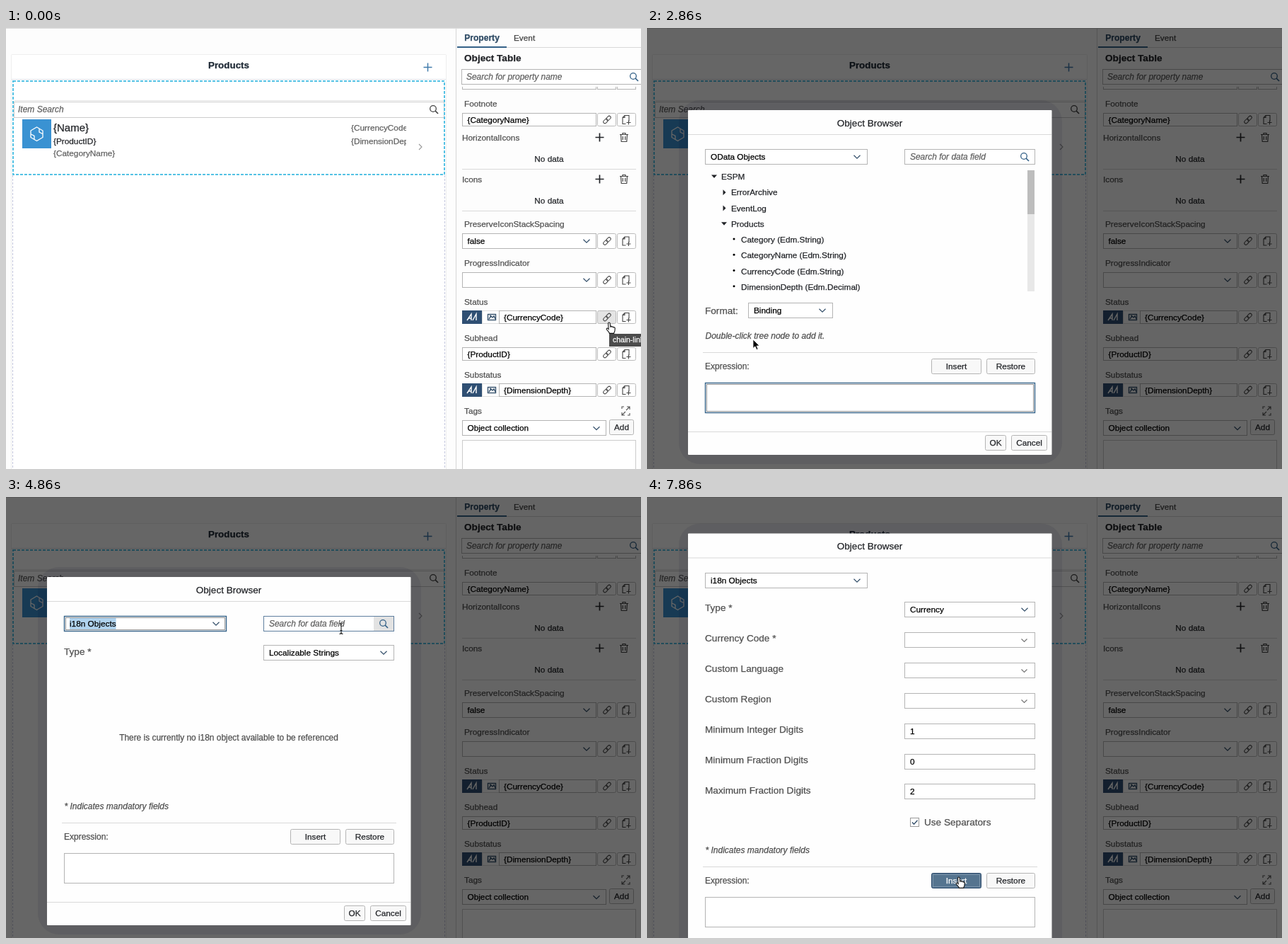
These frames come from a looping animation (898 px wide and 623 px high, 8 s). An HTML page:

```html
<!DOCTYPE html>
<html lang="en">
<head>
<meta charset="utf-8">
<title>Object Browser</title>
<style>
html, body { margin: 0; width: 100%; height: 100%; overflow: hidden; background: #fdfdfd; }
svg { display: block; width: 898px; height: 623px; font: 11.8px 'Liberation Sans', Arial, sans-serif; }
text { white-space: pre; stroke-width: .25px; }
</style>
</head>
<body>
<svg id="stage" viewBox="0 0 898 623" xmlns="http://www.w3.org/2000/svg">
  <clipPath id="cell"><rect x="480" y="130" width="86" height="45"/></clipPath>
  <clipPath id="below"><rect x="640" y="83" width="258" height="10"/></clipPath>
  <g id="page"></g>
  <rect id="dim" width="898" height="623" opacity="0"/>
  <g id="dialog"></g>
  <g id="pointer"></g>
</svg>
<script>
const LOOP = 8000, INK = '#222428', GREY = '#606060', LABEL = '#505050', LINE = '#b4b4b4', BLUE = '#346187';
const $ = id => document.getElementById(id);
const ruler = document.createElement('canvas').getContext('2d');
ruler.font = "11.8px 'Liberation Sans', Arial, sans-serif";
const widthOf = s => ruler.measureText(s).width;

// Basic shapes; text is placed by its vertical middle.
const text = (x, mid, s, { z = 11.8, f = INK, a = 'start', i, b, more = '' } = {}) =>
  `<text x="${x}" y="${mid + z * .345}" font-size="${z}" fill="${f}" stroke="${f}" text-anchor="${a}"` +
  `${i ? ' font-style="italic"' : ''}${b ? ' font-weight="bold"' : ''} ${more}>${s}</text>`;
const value = (x, mid, s) => text(x, mid, s, { f: '#000' });
const fill = (x, y, w, h, c, more = '') =>
  `<rect x="${x}" y="${y}" width="${w}" height="${h}" fill="${c}" ${more}/>`;
const box = (x, y, w, h, c = LINE, bg = '#fff', more = '') =>
  `<rect x="${x + .5}" y="${y + .5}" width="${w - 1}" height="${h - 1}" fill="${bg}" stroke="${c}" ${more}/>`;
const path = (d, c = INK, w = 1, more = '') =>
  `<path d="${d}" fill="none" stroke="${c}" stroke-width="${w}" ${more}/>`;
const hline = (x1, x2, y, c = '#d9d9d9') => fill(x1, y, x2 - x1, 1, c);

// Icons, centred on x, y.
const chevron = (x, y, r = 4.5, c = '#35506b') => path(`M${x - r} ${y - r / 2}l${r} ${r} ${r} ${-r}`, c, 1.2);
const lens = (x, y, c = BLUE) =>
  `<circle cx="${x - 1}" cy="${y - 1}" r="4.3" fill="none" stroke="${c}" stroke-width="1.3"/>` +
  path(`M${x + 2} ${y + 2}l4 4`, c, 1.7);
const plus = (x, y, r, c, w) => path(`M${x - r} ${y}h${2 * r}M${x} ${y - r}v${2 * r}`, c, w);
const chain = (x, y) => `<g transform="translate(${x} ${y}) rotate(-45)">` +
  box(-7, -2.7, 8.2, 5.4, '#444', 'none', 'rx="2.2"') + box(-1.2, -2.7, 8.2, 5.4, '#444', 'none', 'rx="2.2"') + '</g>';
const sheet = (x, y) =>
  path(`M${x - 1} ${y + 6}h-4.5v-9l3-3h6v8M${x - 2.5} ${y - 6}v3h-3`, '#444', 1.1) + plus(x + 3, y + 4, 3, '#444', 1.1);
const bin = (x, y) =>
  path(`M${x - 6} ${y - 4}h12M${x - 2} ${y - 4}v-2h4v2M${x - 4.5} ${y - 4}l.7 10h7.6l.7-10M${x - 1.7} ${y - 1.5}v5M${x + 1.7} ${y - 1.5}v5`, '#444', 1.2);

const button = (x, y, w, h, s, c = LINE, bg = '#f8f8f8', f = INK) =>
  box(x, y, w, h, c, bg, 'rx="2"') + text(x + w / 2, y + h / 2, s, { a: 'middle', f });
const ring = (x, y, w, h) =>
  box(x, y, w, h, BLUE, '#fff', 'stroke-width="1.4"') + box(x + 2, y + 2, w - 4, h - 4, '#333', 'none', 'stroke-dasharray="1 1"');
const marked = (x, mid, s, from = x) =>
  fill(from, mid - 8, x + widthOf(s) - from, 16, '#b0d3ee') + value(x, mid, s);
const select = (x, y, w, s, focused) =>
  (focused ? ring : box)(x, y, w, 22) + (focused ? marked : value)(x + 8, y + 11, s) + chevron(x + w - 15, y + 11);

function tools(y, h, hot) {
  return box(836, y, 27, h, '#bbb', hot ? '#e4e4e4' : '#fff', 'rx="2"') + chain(850, y + h / 2) +
    box(864, y, 27, h, '#bbb', '#fff', 'rx="2"') + sheet(877.5, y + h / 2);
}
const field = (y, h, s) => box(645, y, 190, h) + value(652.5, y + h / 2, s) + tools(y, h);
const combo = (y, s) => field(y, 22, s) + chevron(821, y + 11);
const toggled = (y, s, hot) =>
  fill(645, y, 28, 19, '#2f4f73') +
  path(`M652 ${y + 14}l6-9v9m-4-3h4M660 ${y + 14}l5-9v9`, '#fff', 1.4) +
  box(673, y, 25, 19, '#ddd') + box(681, y + 5, 12, 9, '#35506b', '#fff', 'stroke-width="1.4"') +
  path(`M683 ${y + 12}l3-4 2 2 2-2 2 4M684 ${y + 7.5}h2`, '#35506b', 1.4) +
  box(697, y, 138, 19) + value(704, y + 9.5, s) + tools(y, 19, hot);

function canvasPane() {
  const label = (y, s) => text(488, y, s, { f: GREY, more: 'clip-path="url(#cell)"' });
  return fill(0, 0, 898, 623, '#fdfdfd') + hline(0, 898, 0, '#dcdcdc') +
    fill(7, 37, 616, 600, '#eee', 'rx="2"') + fill(8, 38, 614, 590, '#fff') +
    hline(8, 622, 72, '#dde3ea') +
    text(315, 52, 'Products', { z: 13.4, b: 1, a: 'middle', f: '#1f2a36' }) +
    plus(596.5, 55.5, 6, '#427cac', 1.5) +
    path('M9.5 208V623M620.5 208V623', '#c3c6dd', 1, 'stroke-dasharray="3 2"') +
    hline(12, 619, 102, '#e2e2e2') + box(11, 104, 609, 23, '#ccc') +
    text(17, 115, 'Item Search', { z: 12, i: 1, f: GREY }) + lens(605, 115, '#444') +
    fill(23, 129, 41, 41, '#3a92d2') +
    path('M43.5 140l8.5 5v9.5l-8.5 5-8.5-5v-9.5zM47 142.5v4.5l4.500 2.500M40 157v-4.500l-4.500-2.500', '#fff', 1.3) +
    text(67, 141, '{Name}', { z: 15 }) + text(67, 160, '{ProductID}') +
    text(67, 177, '{CategoryName}', { f: GREY }) +
    label(141, '{CurrencyCode}') + label(160, '{DimensionDepth}') +
    path('M584 164l4 4-4 4', '#999', 1.1) +
    path('M10 75H620V207H10z', '#55c2e4', 2, 'stroke-dasharray="4 2"');
}

function propertyPane() {
  const label = (y, s, x = 648) => text(x, y, s, { f: LABEL });
  const list = (y, s) => label(y, s, 645) + plus(839.5, y, 6, INK, 1.7) + bin(874, y) +
    text(768, y + 30.5, 'No data', { a: 'middle' }) + hline(645, 891, Math.round(y + 44));
  return fill(637, 1, 261, 622, '#fdfdfd') + fill(636, 1, 1, 622, '#d6d6d6') +
    text(673, 14, 'Property', { z: 12.1, b: 1, a: 'middle', f: '#2d4a64' }) + text(718, 14, 'Event', { f: '#444' }) +
    hline(638, 898, 27) + fill(638, 26, 70, 2, BLUE) +
    text(648, 42, 'Object Table', { z: 13.6, b: 1 }) +
    box(644, 58, 260, 22) + text(651, 69, 'Search for property name', { z: 11.95, i: 1, f: GREY }) + lens(888, 69) +
    `<g clip-path="url(#below)">${box(645, 66, 190, 21) + box(836, 66, 27, 21) + box(864, 66, 27, 21)}</g>` +
    label(107, 'Footnote') + field(120, 19, '{CategoryName}') +
    list(154.5, 'HorizontalIcons') + list(213.5, 'Icons') +
    label(277, 'PreserveIconStackSpacing') + combo(290, 'false') +
    label(331.5, 'ProgressIndicator') + combo(345, '') +
    label(386.5, 'Status') + `<g id="status"></g>` +
    label(438, 'Subhead') + field(451, 19, '{ProductID}') +
    label(489.5, 'Substatus') + toggled(502, '{DimensionDepth}') +
    label(541, 'Tags') +
    path('M877 540l5-5m-4 0h4v4M876 542l-5 5m4 0h-4v-4M871 538v-3h3M882 544v3h-3', '#555', 1.1) +
    box(645, 554, 204, 22) + value(652.5, 565, 'Object collection') + chevron(835, 565.5) +
    button(853, 553, 35, 22, 'Add') + box(645, 582, 246, 60, '#ccc');
}

// Pointer stops: time, x, y, shape; straight moves between them, redrawn every 200 ms.
const stops = [
  [0, 853, 416, 'hand'], [60, 852, 416, 'hand'], [260, 800, 414, 'arrow'], [460, 712, 411, 'arrow'],
  [1060, 200, 514, 'beam'], [1260, 176, 514, 'beam'], [1460, 174, 514, 'beam'], [1860, 90, 514, 'beam'],
  [2660, 90, 514, 'beam'], [2860, 150, 440, 'arrow'], [3260, 297, 182, 'arrow'], [3660, 224, 316, 'arrow'],
  [4060, 150, 364, 'arrow'], [4260, 148, 365, 'arrow'], [4860, 474, 186, 'beam'], [5060, 515, 206, 'arrow'],
  [5260, 534, 220, 'arrow'], [5460, 534, 221, 'arrow'], [5860, 450, 278, 'arrow'], [6260, 448, 280, 'arrow'],
  [6660, 477, 306, 'arrow'], [7260, 446, 520, 'arrow'], [7460, 441, 537, 'hand'], [8000, 441, 537, 'hand']
];
const shapes = {
  arrow: '<path d="M0 0v12.5l2.900-2.700 2.100 4.700 2-.9-2-4.600h4z" fill="#000" stroke="#fff" stroke-width=".8"/>',
  beam: path('M-2.5-7.5q2.500 0 2.500 2v11q0 2-2.500 2M2.500-7.500q-2.500 0-2.500 2v11q0 2 2.500 2M-1.500 2.500h3', '#222', 1.1),
  hand: '<path transform="scale(1.1)" d="M-1.3 1.200c0-1.600 2.200-1.600 2.400 0l.5 4.200c.4-.8 2-.6 2.100.4.600-.6 1.900-.3 2 .6.800-.4 1.800.1 1.800 1.200l-.3 3.200c-.2 1.200-1 1.800-1.100 3.200h-5.800c-.4-2-2.600-3.400-3.600-5.200-.6-1.200.8-2 1.800-1l.7.8z" fill="#fff" stroke="#111"/>'
};
function pointerAt(t) {
  const q = t < 60 ? 0 : 60 + Math.floor((t - 60) / 200) * 200;
  const n = stops.findLastIndex(s => s[0] <= q);
  const a = stops[n], b = stops[n + 1] || a;
  const k = b === a ? 0 : (q - a[0]) / (b[0] - a[0]);
  return { x: a[1] + (b[1] - a[1]) * k, y: a[2] + (b[2] - a[2]) * k, shape: a[3] };
}

const sources = ['OData Functions Result', 'OData Objects', 'Global Data', 'Rules', 'Image Reference', 'i18n Objects', 'Expressions'];
function menu(x, y, w, items, chosen, p) {
  const step = 30.85, h = items.length * step;
  const hot = p.x > x && p.x < x + w ? Math.floor((p.y - y) / step) : -1;
  return box(x, y, w, h + 1, '#ccc') + items.map((s, i) => {
    const bg = i === chosen ? '#17528a' : i === hot ? '#efefef' : '#fff';
    return fill(x + 1, y + i * step + .5, w - 2, step, bg) +
      text(x + 6, y + (i + .5) * step, s, { f: i === chosen ? '#fff' : INK });
  }).join('');
}

function frame(top, rule) {
  const h = rule + 145 - top;
  return fill(45, top - 14, 542, h + 27, '#0c0c28', 'rx="30" opacity=".08"') +
    fill(58, top, 514.5, h, '#fefefe', 'rx="1"') +
    text(315, top + 18, 'Object Browser', { z: 13.5, a: 'middle' }) + hline(58, 572, top + 34) +
    hline(79, 552, rule) + text(82, rule + 20, 'Expression:', { z: 12, f: LABEL }) +
    button(480, rule + 9, 69, 22, 'Restore') + hline(58, 572, rule + 112) +
    button(478, rule + 117, 30, 22, 'OK') + button(515, rule + 117, 51, 22, 'Cancel');
}
const search = (y, hot) =>
  box(364, y, 185, 22, hot ? '#5f7f9f' : LINE) + (hot ? fill(520, y + 1, 28, 20, '#e2e2e2') : '') +
  text(372, y + 10.5, 'Search for data field', { z: 11.95, i: 1, f: GREY }) + lens(534, y + 11);
const insert = (rule, down) => down
  ? button(402, rule + 9, 71, 22, 'Insert', '#2c4a6b', '#55748f', '#fff') +
    box(404, rule + 11, 67, 18, '#9db0c2', 'none', 'stroke-dasharray="1 1"')
  : button(402, rule + 9, 71, 22, 'Insert');
const note = (rule, s) => text(82.5, rule - 23.5, s, { z: 12, i: 1, f: LABEL });
const label = (y, s) => text(82, y, s, { z: 13.6, f: LABEL });
const output = (rule, focused) => (focused ? ring : box)(82, rule + 43, 467, 43);

function tree() {
  const names = ['ESPM', 'ErrorArchive', 'EventLog', 'Products', 'Category (Edm.String)',
    'CategoryName (Edm.String)', 'CurrencyCode (Edm.String)', 'DimensionDepth (Edm.Decimal)'];
  return names.map((s, i) => {
    const y = 210 + i * 22.25, level = i === 0 ? 0 : i < 4 ? 1 : 2, x = 95 + level * 14;
    const mark = level === 2 ? `<circle cx="${x}" cy="${y - 1}" r="1.5"/>`
      : i % 3 === 0 ? `<path d="M${x - 4} ${y - 2.5}h8l-4 4.5z" fill="${INK}"/>`
      : `<path d="M${x - 1.5} ${y - 4}v8l4-4z" fill="${INK}"/>`;
    return mark + text(x + 10, y, s);
  }).join('') + fill(538, 201, 10, 171, '#e8e8e8') + fill(538, 201, 10, 62, '#bdbdbd');
}

function odataView(t, p) {
  const rule = 458, open = t >= 3260, expr = '{CurrencyCode}';
  let s = frame(116, rule) + insert(rule) + search(171) + tree() +
    label(399, 'Format:') + select(143, 388, 120, 'Binding') +
    note(rule, 'Double-click tree node to add it.') + output(rule, t >= 1260 && !open) +
    select(82, 171, 230, 'OData Objects', open || t >= 500 && t < 1260);
  if (t < 2460) s += t >= 1460 ? marked(90, rule + 55, expr, p.x) : value(90, rule + 55, expr);
  return open ? s + menu(82, 195, 230, sources, 1, p) : s;
}

function stringsView(t, p) {
  const top = 113, rule = 460, picked = t >= 6260;
  const s = frame(top, rule) + insert(rule) + search(top + 55, t >= 4860 && t < 5060) +
    select(82, top + 55, 230, 'i18n Objects', t < 5260) + label(top + 105, 'Type *') +
    select(364, top + 96, 185, picked ? 'Currency' : 'Localizable Strings', t >= 5260) +
    text(315, 340, 'There is currently no i18n object available to be referenced', { z: 11.92, a: 'middle', f: LABEL }) +
    note(rule, '* Indicates mandatory fields') + output(rule);
  return t >= 5460 && !picked ? s + menu(364, 233, 185, ['Localizable Strings', 'Currency'], 0, p) : s;
}

function currencyView(t) {
  const top = t < 6860 ? 56 : 51.5, base = Math.round(top), rule = Math.round(top + 470.7), pressed = t >= 7860;
  const rows = ['Currency Code *', 'Custom Language', 'Custom Region',
    'Minimum Integer Digits', 'Minimum Fraction Digits', 'Maximum Fraction Digits'];
  const values = ['', '', '', '1', '0', '2'];
  return frame(top, rule) + insert(rule, pressed) +
    select(82, base + 55, 230, 'i18n Objects') + label(top + 105, 'Type *') +
    select(364, base + 96, 185, 'Currency', !pressed) +
    rows.map((s, i) => {
      const y = top + 105 + (i + 1) * 42.9, by = Math.round(y - 8.5);
      return label(y, s) + box(364, by, 185, 22) +
        (i < 3 ? chevron(533.5, by + 11.5, 4, '#777') : value(372, by + 11, values[i]));
    }).join('') +
    box(372, base + 401, 13, 13, '#999') + path(`M375 ${base + 407.5}l2.5 2.8 5-5.5`, '#35506b', 1.4) +
    text(392, top + 407.5, 'Use Separators', { z: 13.6, f: LABEL }) +
    note(rule, '* Indicates mandatory fields') + output(rule);
}

function dialogAt(t, p) {
  if (t < 60) return '';
  return t < 4460 ? odataView(t, p) : t < 6460 ? stringsView(t, p) : currencyView(t);
}

const shown = {};
function put(id, html) {
  if (shown[id] !== html) $(id).innerHTML = shown[id] = html;
}
function render(t) {
  const p = pointerAt(t);
  const tip = t < 30 ? fill(853, 432, 45, 18, '#4c4c4c') + text(858, 440.5, 'chain-link', { z: 10.4, f: '#fff' }) : '';
  put('status', toggled(399, '{CurrencyCode}', t < 60));
  $('dim').setAttribute('opacity', t < 30 ? 0 : t < 60 ? .3 : .6);
  put('dialog', dialogAt(t, p));
  put('pointer', tip + `<g transform="translate(${p.x} ${p.y})">${shapes[p.shape]}</g>`);
}

$('page').innerHTML = canvasPane() + propertyPane();
const start = performance.now();
function tick() {
  render((performance.now() - start) % LOOP);
  requestAnimationFrame(tick);
}
render(0);
requestAnimationFrame(tick);
</script>
</body>
</html>
```
